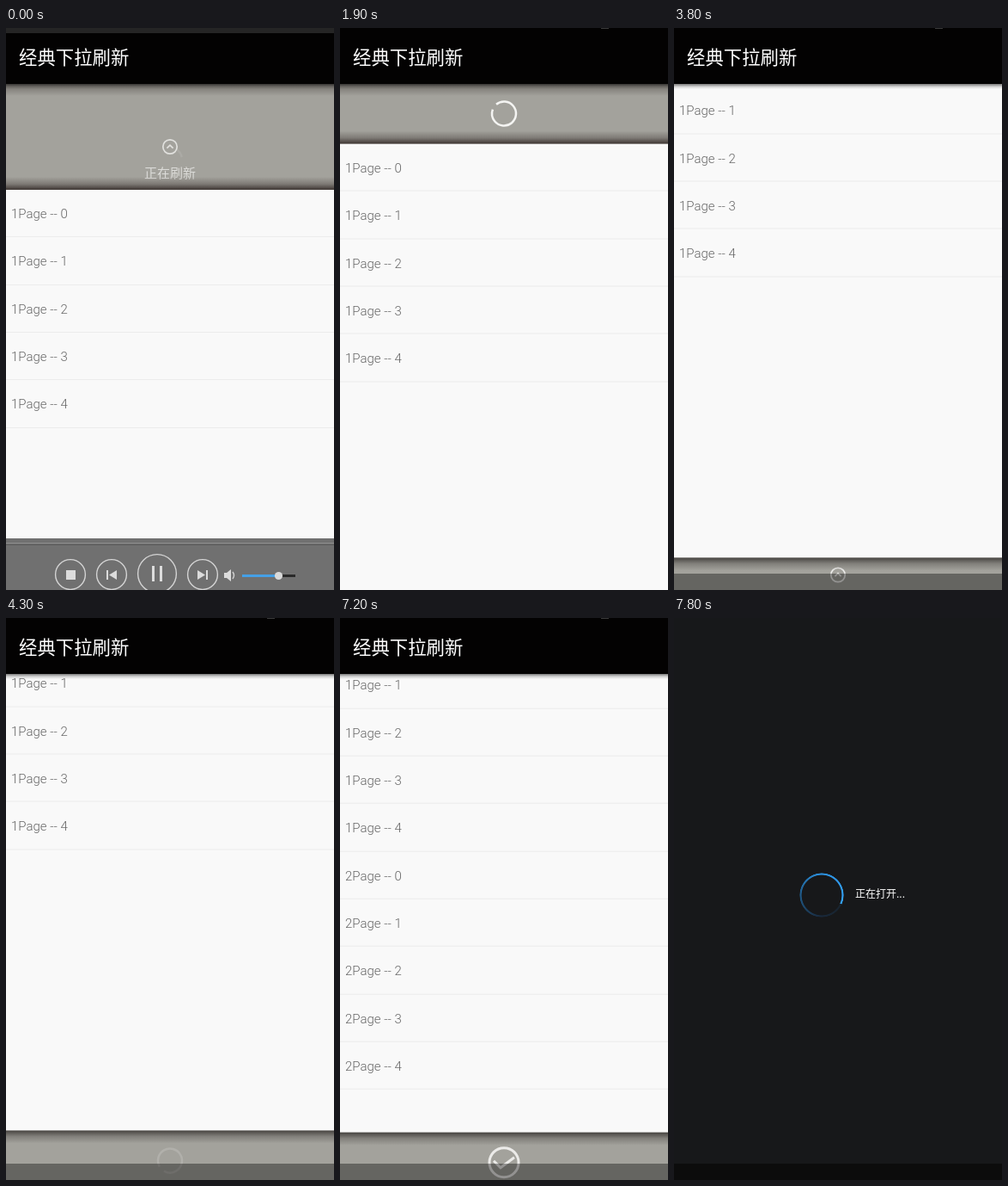
An HTML page for the animation above (7900 ms loop, 382x653 px).

```html
<!DOCTYPE html>
<html lang="zh-CN">
<head>
<meta charset="utf-8">
<title>经典下拉刷新</title>
<style>
html, body { margin: 0; width: 100%; height: 100%; overflow: hidden; background: #000; }
#stage {
  position: relative; width: 382px; height: 653px; overflow: hidden;
  background: #a3a29c; font-family: "Noto Sans CJK SC", "Noto Sans CJK", sans-serif;
}
#stage > *, .abs { position: absolute; left: 0; width: 382px; }
#glow { top: 65px; height: 14px; background: linear-gradient(rgba(50, 42, 40, .45), rgba(50, 42, 40, 0)); }
#band { top: 634px; height: 19px; background: rgba(0, 0, 0, .38); }
#list { top: 65px; height: 603px; background: #f9f9f9; }
#list::before, #list::after { content: ""; position: absolute; left: 0; width: 100%; height: 15px; }
#list::before { bottom: 100%; background: linear-gradient(rgba(40, 30, 28, 0), rgba(40, 30, 28, .3) 55%, rgba(40, 30, 28, .82)); }
#list::after { top: 100%; background: linear-gradient(rgba(40, 36, 34, .75), rgba(40, 36, 34, .28) 45%, rgba(40, 36, 34, 0)); }
.row {
  position: absolute; left: 0; width: 100%; height: 55.33px; box-sizing: border-box;
  padding: 1px 0 0 6px; border-bottom: 1px solid #ececec;
  font: 300 15px/55.33px Roboto, sans-serif; color: #666; white-space: pre;
}
.box { height: 70px; overflow: visible; fill: none; stroke: #f4f4f2; stroke-linecap: butt; }
.box text { fill: #f4f4f2; stroke: none; font-size: 15px; text-anchor: middle; }
#bar { top: 0; height: 65px; background: #030202; }
#bar::after {
  content: ""; position: absolute; top: 65px; left: 0; width: 100%; height: 6px;
  background: linear-gradient(rgba(0, 0, 0, .5), rgba(0, 0, 0, .16) 50%, rgba(0, 0, 0, 0));
}
#bar h1 { position: absolute; left: 15px; top: 13px; margin: 0; font-size: 21.4px; font-weight: 400; line-height: 40px; color: #fff; white-space: nowrap; }
#bar i { position: absolute; left: 304px; top: 0; width: 9px; height: 1px; background: #3a3a3a; }
#player { top: 0; height: 653px; }
#opening { top: 0; height: 653px; background: #17181a; }
#opening b { position: absolute; left: 0; top: 634px; width: 100%; height: 19px; background: #0c0c0c; }
#opening i {
  position: absolute; left: 146px; top: 296px; width: 52px; height: 52px; border-radius: 50%;
  background: conic-gradient(from 115deg, #18232d, #19283a 18%, #1f5784 42%, #2a8bd6 65%, #35a4fb);
  -webkit-mask: radial-gradient(circle, transparent 23px, #000 23.8px, #000 25.2px, transparent 26px);
  mask: radial-gradient(circle, transparent 23px, #000 23.8px, #000 25.2px, transparent 26px);
}
#opening span { position: absolute; left: 211px; top: 310px; font-size: 12px; line-height: 20px; color: #fff; white-space: nowrap; }
</style>
</head>
<body>
<div id="stage">
  <div id="glow"></div>
  <svg class="box" id="head"></svg>
  <svg class="box" id="foot"></svg>
  <div id="band"></div>
  <div id="list"></div>
  <div id="bar"><h1>经典下拉刷新</h1><i></i></div>
  <svg id="player" viewBox="0 0 382 653">
    <rect width="382" height="6" fill="#252525"/>
    <rect y="593" width="382" height="60" fill="#707070"/>
    <path d="M0 598.5H382" stroke="#8d8d8d"/>
    <path d="M0 600.5H382" stroke="#5a5a5a"/>
    <g fill="none" stroke="#d4d4d4" stroke-width="1.4">
      <circle cx="75" cy="635" r="17.4"/>
      <circle cx="123" cy="635" r="17.4"/>
      <circle cx="176" cy="634" r="22.4"/>
      <circle cx="229" cy="635" r="17.4"/>
      <path d="M264 632q3 4 0 8"/>
    </g>
    <path fill="#dcdcdc" d="M70 630h11v11H70zM117 630h2v11h-2zM129 630v11l-9-5.500zM170 625h3v18h-3zM179 625h3v18h-3zM223 630v11l9-5.500zM233 630h2v11h-2zM254 633h3l5-4v14l-5-4h-3z"/>
    <path d="M317 636.500H337" stroke="#2a2a2a" stroke-width="3"/>
    <path d="M275 636.500H317" stroke="#45a0e6" stroke-width="3"/>
    <circle cx="317.500" cy="636.500" r="4.600" fill="#dadada"/>
  </svg>
  <div id="opening"><b></b><i></i><span>正在打开...</span></div>
</div>
<script>
const LOOP = 7900, STEP = 100, ROW = 55.33;
const el = id => document.getElementById(id);
const ramp = (t, a, b) => Math.min(1, Math.max(0, (t - a) / (b - a)));
const smooth = (t, a, b) => { const x = ramp(t, a, b); return x * x * (3 - 2 * x); };

const rows = [];
for (let i = 0; i < 10; i++) {
  const row = document.createElement('div');
  row.className = 'row';
  row.textContent = `${i < 5 ? 1 : 2}Page -- ${i % 5}`;
  row.style.top = i * ROW + 'px';
  el('list').append(row);
  rows.push(row);
}

// Indicator: arrow, spinner, tick and label in a 70px strip
function indicator(id) {
  const svg = el(id);
  svg.innerHTML = `
    <g class="arrow" stroke-width="1.7"><circle r="8.2"/><path d="M-3.600 1.700L0-1.900L3.600 1.700"/></g>
    <circle class="spin" r="14" stroke-width="2.500" pathLength="360"/>
    <g class="tick" stroke-width="3"><circle r="17"/><path d="M-12-2L-4 6L12-6"/></g>
    <text x="191"></text>`;
  const [arrow, spin, tick, label] = svg.children;
  return { svg, arrow, spin, tick, label };
}

const head = indicator('head'), foot = indicator('foot');
const headTimes = { out: [-50, 300], spin: [-50, 450], pop: [2450, 2650], shrink: [2650, 2850] };
const footTimes = { out: [4000, 4250], spin: [4240, 4600], pop: [6850, 7100], shrink: [7200, 7400] };

function drawIndicator(p, k, t, y, flip, words) {
  p.svg.style.transform = `translateY(${y}px)`;
  const out = ramp(t, ...k.out), pop = ramp(t, ...k.pop), shrink = smooth(t, ...k.shrink);

  p.arrow.setAttribute('transform', `translate(191 20) rotate(${flip})`);
  p.arrow.style.opacity = .9 * (1 - out);

  const sweep = 180 + 150 * Math.cos(2 * Math.PI * (t - 1900) / 1200);
  const start = 215 + (t - 1900) / 2.4 + (360 - sweep) / 2;
  p.spin.setAttribute('transform', `translate(191 35) rotate(${start})`);
  p.spin.setAttribute('stroke-dasharray', `${sweep} ${360 - sweep}`);
  p.spin.style.opacity = ramp(t, ...k.spin) * (1 - pop);

  p.tick.setAttribute('transform', `translate(191 ${35 - 15 * shrink}) scale(${.8 + .2 * pop - .5 * shrink})`);
  p.tick.style.opacity = .9 * pop;

  p.label.textContent = words;
  p.label.setAttribute('y', 55.7 + (pop ? 12 * (1 - shrink) : 0));
  p.label.style.opacity = pop ? shrink : .82 * (1 - out);
}

// How far the list is pulled from rest
function pull(t) {
  if (t < 700) return 69.5 + 53.5 * (1 - t / 700) ** 3;
  if (t < 3400) return 69.5 * (1 - smooth(t, 2800, 3400));
  if (t < 4000) return -105 * smooth(t, 3600, 4000);
  if (t < 4400) return -70.3 - 34.7 * (1 - ramp(t, 4000, 4400)) ** 2;
  return -70.3 * (1 - smooth(t, 7200, 7500));
}

function footWords(t) {
  if (t >= 6850) return '加载完成';
  if (t >= 4000) return '正在加载';
  return t < 3850 ? '上拉加载' : '释放加载';
}

function draw(now) {
  const t = Math.floor(now % LOOP / STEP) * STEP;
  const d = pull(t);
  el('list').style.transform = `translateY(${d}px)`;
  rows.forEach((row, i) => row.style.display = i < 5 || t >= 6700 ? '' : 'none');

  head.svg.style.display = d > 0 ? '' : 'none';
  foot.svg.style.display = d < 0 ? '' : 'none';
  drawIndicator(head, headTimes, t, d - 5, 0, t < 2450 ? '正在刷新' : '刷新完成');
  drawIndicator(foot, footTimes, t, 668 + d, 180 * ramp(t, 3820, 3950), footWords(t));

  el('player').style.opacity = 1 - ramp(t, 1100, 1400);
  el('opening').style.display = t >= 7800 ? '' : 'none';
}

el('head').style.top = el('foot').style.top = 0;
const began = performance.now();
function tick() {
  draw(performance.now() - began);
  requestAnimationFrame(tick);
}
tick();
</script>
</body>
</html>
```
